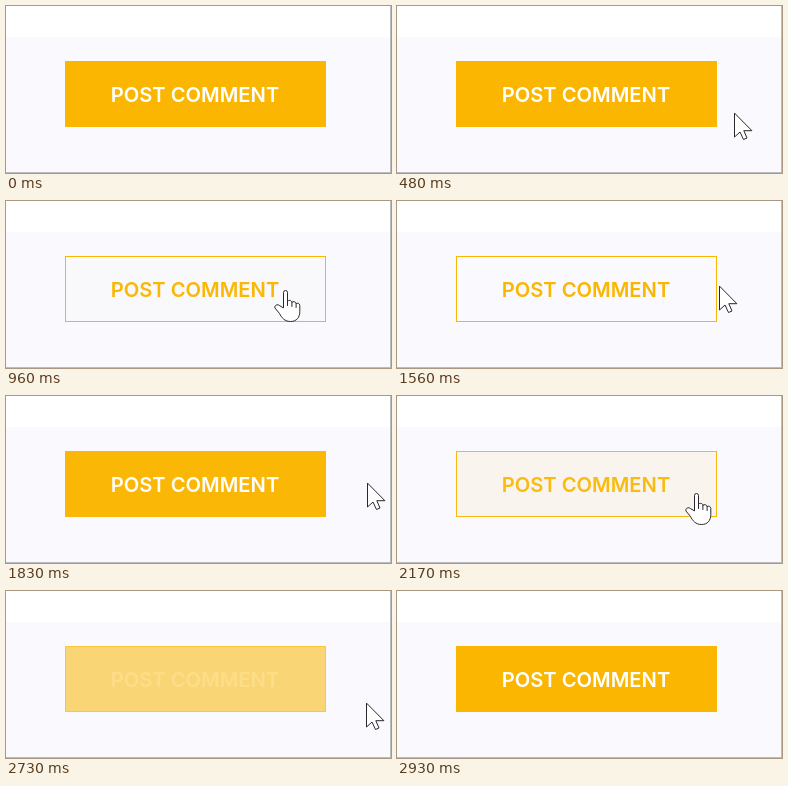
These frames come from a looping animation (385 by 167 pixels, 3460 ms). An HTML page:

```html
<!DOCTYPE html>
<html lang="en">
<head>
<meta charset="utf-8">
<title>Button hover</title>
<style>
  html, body { margin: 0; width: 100%; height: 100%; overflow: hidden; background: #fff; }
  svg { display: block; width: 385px; height: 167px; --hover: 0; }
  .face { fill: #fab600; fill-opacity: calc(1 - var(--hover)); }
  .edge { fill: none; stroke: #fab600; stroke-opacity: var(--hover); }
  .label {
    font: 600 20.2px Poppins, Inter, sans-serif;
    text-anchor: middle;
    fill: color-mix(in srgb, #fab600 calc(var(--hover) * 100%), #fff);
  }
  .cursor { fill: #fff; stroke: #29272c; stroke-linejoin: round; stroke-linecap: round; }
  .crease { fill: none; }
</style>
</head>
<body>
<svg id="stage" viewBox="0 0 385 167">
  <rect width="385" height="167" fill="#fff"/>
  <rect y="31" width="385" height="136" fill="#f9f9fe"/>
  <path d="M384.5 0V167M0 166.5H385" stroke="#bcbcc0"/>
  <rect class="face" x="59" y="55" width="261" height="66"/>
  <rect class="edge" x="59.5" y="55.5" width="260" height="65"/>
  <text class="label" x="189" y="96">POST COMMENT</text>
  <g id="arrow" class="cursor">
    <path d="M0 0V23.5L5.5 18.5L9 26L12.5 24.5L9.3 17.2H17Z"/>
  </g>
  <g id="hand" class="cursor">
    <path d="M-2 17V2a2 2 0 0 1 4 0V11c.8-1.8 4.4-1.4 4.4 1c.8-1.5 4-1 4.2 1.2c1-1.2 3.7-.5 3.7 1.8V21C14.3 27 11 31 5 31C-1 31-4 27-6 23L-10.5 17.5C-11.5 15-8 13-6 15Z"/>
    <path class="crease" d="M2 11V15M6.4 12V16M10.6 13.2V17"/>
  </g>
</svg>
<script>
const LOOP = 3460;
const FADE = 300;
const BUTTON_RIGHT = 320;
const OFFSTAGE = { x: 390, y: 170 };

// Pointer moves: time span, steps, end point, ease-out power, vertical bend;
// hover or leave begins at the given time
const moves = [
  { start: 130, end: 610, steps: 8, x: 330, y: 98, pow: 1.5, bend: 0 },
  { start: 680, end: 1030, steps: 6, x: 276, y: 90, pow: 1.5, bend: -2.6, hover: 700 },
  { start: 1360, end: 1830, steps: 8, x: 361, y: 87, pow: 1.15, bend: -2.8, leave: 1590 },
  { start: 1900, end: 2310, steps: 7, x: 298, y: 97.5, pow: 3.2, bend: 0, hover: 1968 },
  { start: 2530, end: 2930, steps: 7, ...OFFSTAGE, pow: 1.35, bend: -35, leave: 2637 }
];

const stage = document.getElementById("stage");
const arrow = document.getElementById("arrow");
const hand = document.getElementById("hand");
const lerp = (a, b, k) => a + (b - a) * k;

// CSS "ease": cubic-bezier(.25, .1, .25, 1)
function ease(x) {
  const bez = (a, b, u) => 3 * a * u * (1 - u) ** 2 + 3 * b * u * u * (1 - u) + u ** 3;
  let lo = 0, hi = 1;
  for (let i = 0; i < 20; i++) {
    const mid = (lo + hi) / 2;
    if (bez(.25, .25, mid) < x) lo = mid; else hi = mid;
  }
  return bez(.1, 1, lo);
}

// Move in progress or last finished, with its current step and stepped time
function locate(t) {
  const index = moves.findLastIndex(m => m.start <= t);
  if (index < 0) return { index, step: 0, time: 0 };
  const { start, end, steps } = moves[index];
  const gap = (end - start) / (steps - 1);
  const step = Math.min(steps - 1, Math.floor((t - start + 4) / gap));
  return { index, step, time: start + step * gap };
}

function pointer({ index, step }) {
  if (index < 0) return OFFSTAGE;
  const from = moves[index - 1] ?? OFFSTAGE, to = moves[index];
  const k = (step + 1) / to.steps;
  const eased = 1 - (1 - k) ** to.pow;
  return {
    x: lerp(from.x, to.x, eased),
    y: lerp(from.y, to.y, eased) + to.bend * Math.sin(Math.PI * k)
  };
}

function hoverAmount(time) {
  const last = moves.findLast(m => (m.hover ?? m.leave) <= time);
  if (!last) return 0;
  const k = ease(Math.min(1, (time - (last.hover ?? last.leave)) / FADE));
  return last.hover ? k : 1 - k;
}

function draw(now) {
  const place = locate(now % LOOP);
  const { x, y } = pointer(place);
  const inside = x < BUTTON_RIGHT;
  for (const [el, on] of [[arrow, !inside], [hand, inside]]) {
    el.setAttribute("visibility", on ? "visible" : "hidden");
    el.setAttribute("transform", `translate(${Math.floor(x) + .5} ${Math.floor(y) + .5})`);
  }
  stage.style.setProperty("--hover", hoverAmount(place.time).toFixed(4));
}

const begin = performance.now();
function tick() {
  draw(performance.now() - begin);
  requestAnimationFrame(tick);
}
tick();
</script>
</body>
</html>
```
